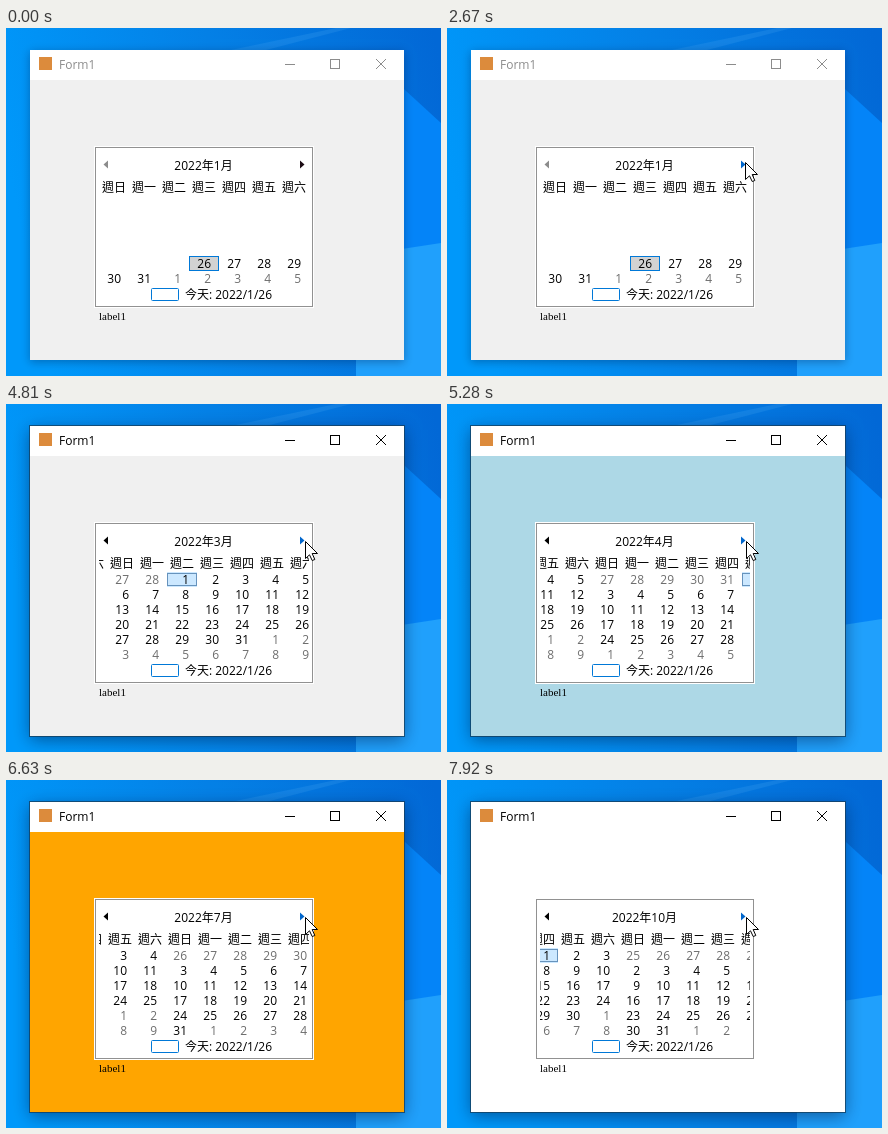
These frames come from a looping animation (435 px wide and 348 px high, 7990 ms). An HTML page with a canvas:

```html
<!DOCTYPE html>
<html lang="zh-Hant">
<head>
<meta charset="utf-8">
<style>
  html, body { margin: 0; width: 100%; height: 100%; overflow: hidden; background: #0585ec; }
  canvas { display: block; }
</style>
</head>
<body>
<canvas id="stage" width="435" height="348"></canvas>
<script>
const ctx = document.getElementById('stage').getContext('2d');
const LOOP = 7990;
const UI = '12px "Open Sans", "Noto Sans CJK TC", "Noto Sans CJK", sans-serif';
const PITCH = 30, ROW = 15, PAGE = 7 * PITCH;
const SPEED = 0.84;            // scroll, px per ms
const TURN = 70, PRESS = 140;  // ms from a click to the new title and to the release

// Moments of the clicks on the right arrow, one month each.
const clicks = [2760, 4570, 5093, 5580, 5919, 6459, 6859, 7331, 7764];
const seasons = ['#f0f0f0', '#add8e6', '#ffa500', '#ffffff'];

// Pointer stops: departure, arrival, and the place reached.
const home = { x: 300, y: 349 };
const stops = [
  { from: 430, to: 1230, x: 155, y: 276 },
  { from: 1270, to: 1850, x: 243, y: 228 },
  { from: 2080, to: 2670, x: 298, y: 134 },
  { from: 3380, to: 3760, x: 153, y: 176 },
  { from: 3760, to: 4040, x: 266, y: 161 },
  { from: 4040, to: 4250, x: 299, y: 137 }
];

const clamp = u => Math.max(0, Math.min(1, u));
const ease = u => u * u * (3 - 2 * u);

function pointerAt(t) {
  let { x, y } = home;
  for (const stop of stops) {
    const u = ease(clamp((t - stop.from) / (stop.to - stop.from)));
    x += (stop.x - x) * u;
    y += (stop.y - y) * u;
  }
  return { x: Math.round(x), y: Math.round(y) };
}

function calendarAt(t) {
  const done = clicks.filter(c => c <= t).length;
  const age = done ? t - clicks[done - 1] : Infinity;
  return {
    month: done,
    remaining: Math.max(0, PAGE - Math.round(age * SPEED)),
    shown: age < TURN ? done - 1 : done,
    pressed: age < PRESS
  };
}

function rect(x, y, w, h, fill) {
  ctx.fillStyle = fill;
  ctx.fillRect(x, y, w, h);
}

function frame(x, y, w, h, color, dash = []) {
  ctx.strokeStyle = color;
  ctx.setLineDash(dash);
  ctx.strokeRect(x + .5, y + .5, w - 1, h - 1);
  ctx.setLineDash([]);
}

function fillPath(d, fill) {
  ctx.fillStyle = fill;
  ctx.fill(new Path2D(d));
}

function text(str, x, y, color = '#000', align = 'left', font = UI) {
  ctx.font = font;
  ctx.textAlign = align;
  ctx.fillStyle = color;
  ctx.fillText(str, x, y);
}

function drawDesktop() {
  const sky = ctx.createLinearGradient(0, 130, 435, 40);
  ['#0098fa', '#0480e6', '#0268d6'].forEach((c, i) => sky.addColorStop(i / 2, c));
  rect(0, 0, 435, 348, sky);
  fillPath('M225 22L330 0H345L260 22Z', 'rgba(120,200,255,.12)');
  fillPath('M375 40L435 95V216L350 235Z', '#0484f8');
  fillPath('M350 228L435 215V348H350Z', '#20a0fc');
}

function drawWindow(active, client) {
  ctx.save();
  ctx.shadowColor = `rgba(0,20,60,${active ? .5 : .35})`;
  ctx.shadowBlur = active ? 16 : 9;
  ctx.shadowOffsetY = active ? 4 : 2;
  rect(24, 22, 374, 310, '#fff');
  ctx.restore();
  rect(24, 52, 374, 280, client);
  if (active) frame(23, 21, 376, 312, 'rgba(20,60,90,.75)');

  const ink = active ? '#000' : '#8c8c8c';
  rect(33, 29, 13, 13, '#dc8b3c');
  text('Form1', 53, 41, ink);
  rect(279, 36, 10, 1, ink);
  frame(324, 31, 10, 10, ink);
  ctx.strokeStyle = ink;
  ctx.stroke(new Path2D('M370 31l10 10m0-10l-10 10'));
}

function drawMonth(month, x) {
  [...'日一二三四五六'].forEach((d, i) => text('週' + d, x + 108 + i * PITCH, 164, '#000', 'center'));
  const lead = new Date(2022, month, 1).getDay() || 7;
  const selected = month ? 1 : 26;
  for (let i = 0; i < 42; i++) {
    const date = new Date(2022, month, 1 - lead + i);
    if (date < new Date(2022, 0, 26)) continue;
    const left = x + 93 + i % 7 * PITCH;
    const top = 168 + Math.floor(i / 7) * ROW;
    const current = date.getMonth() === month;
    if (current && date.getDate() === selected) {
      rect(left, top, 30, 15, month ? '#cce8ff' : '#d2d2d2');
      if (month) frame(left, top + 1, 30, 13, '#003c78', [1, 1]);
      else frame(left, top, 30, 15, '#0078d7');
    }
    text(date.getDate(), left + 22, top + 12, current ? '#000' : '#6d6d6d', 'right');
  }
}

function drawArrow(baseX, direction, color) {
  fillPath(`M${baseX} 132.5v8l${4.5 * direction}-4z`, color);
}

function drawCalendar({ month, remaining, shown, pressed }, hot) {
  rect(88, 118, 220, 162, '#fff');
  frame(89, 119, 218, 160, '#919191');
  text(`2022年${shown + 1}月`, 197.5, 142, '#000', 'center');
  drawArrow(102, -1, shown ? '#000' : '#8c8c8c');
  drawArrow(294, 1, !hot ? '#1c0c14' : pressed ? '#6d6d6d' : '#0066cc');

  ctx.save();
  ctx.beginPath();
  ctx.rect(93, 150, 210, 109);
  ctx.clip();
  if (remaining) drawMonth(month - 1, remaining - PAGE);
  drawMonth(month, remaining);
  ctx.restore();

  ctx.strokeStyle = '#0078d7';
  ctx.beginPath();
  ctx.roundRect(145.5, 260.5, 27, 12, 1);
  ctx.stroke();
  text('今天: 2022/1/26', 222.5, 271, '#000', 'center');
  text('label1', 93, 292, '#000', 'left', '11px "Liberation Serif", serif');
}

function drawPointer({ x, y }) {
  const outline = new Path2D('M0 0V17L4 13.3L6.7 19L9.3 18L6.7 12H12Z');
  ctx.save();
  ctx.translate(x + .5, y + .5);
  ctx.fillStyle = '#fff';
  ctx.fill(outline);
  ctx.strokeStyle = '#000';
  ctx.stroke(outline);
  ctx.restore();
}

function drawPress({ x, y }) {
  ctx.beginPath();
  ctx.arc(x, y, 15, 0, 2 * Math.PI);
  ctx.fillStyle = 'rgba(250,240,30,.6)';
  ctx.fill();
}

function draw(t) {
  const calendar = calendarAt(t);
  const pointer = pointerAt(t);
  drawDesktop();
  drawWindow(t >= clicks[0], seasons[Math.floor(calendar.shown / 3)]);
  drawCalendar(calendar, pointer.x > 290 && pointer.y < 145);
  drawPointer(pointer);
  if (calendar.pressed) drawPress(pointer);
}

function tick() {
  draw(performance.now() % LOOP);
  requestAnimationFrame(tick);
}
tick();
</script>
</body>
</html>
```
